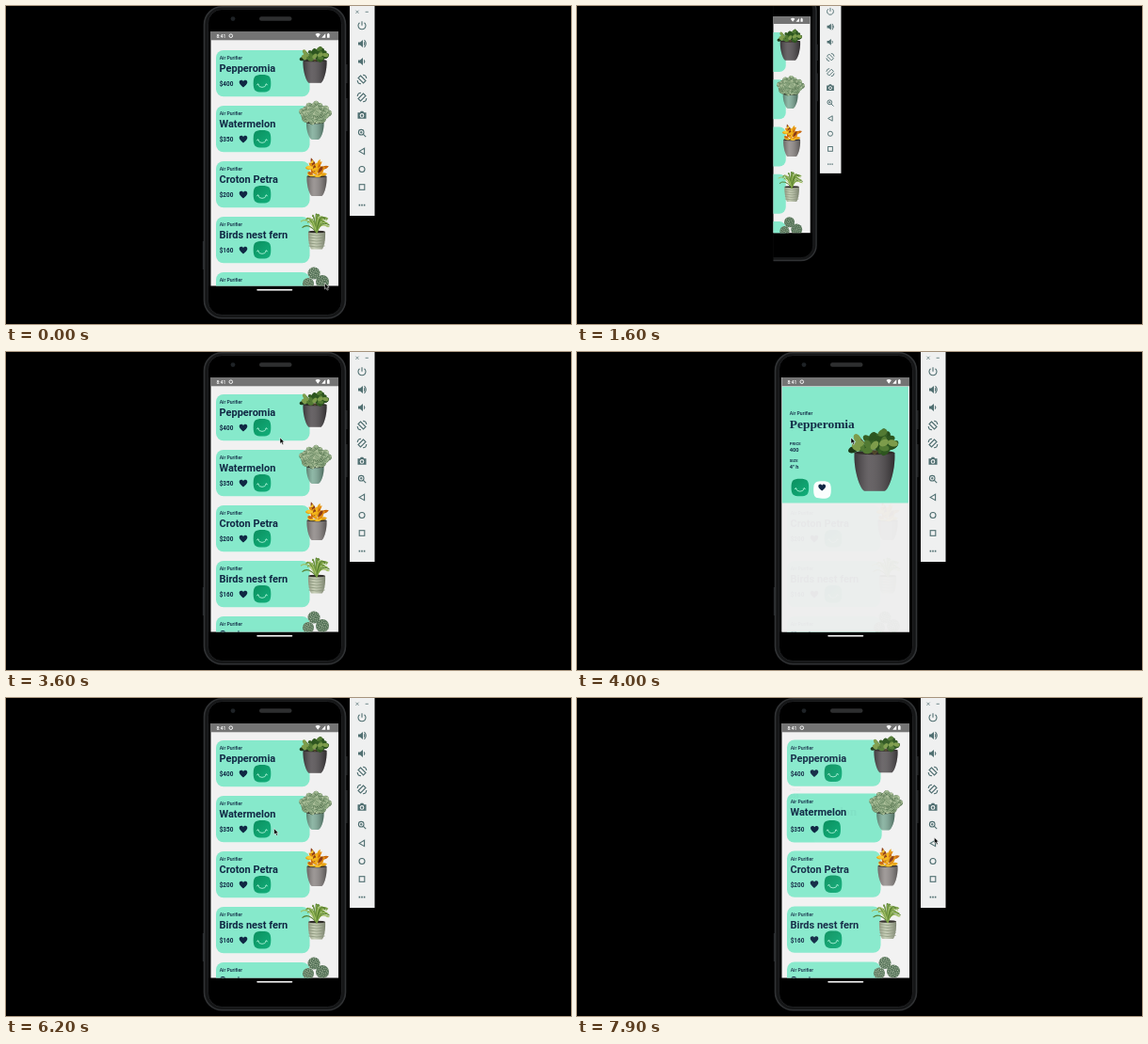
An HTML page for the animation above (8 s loop, 600 by 338 pixels).

```html
<!DOCTYPE html>
<html lang="en">
<head>
<meta charset="utf-8">
<title>Plant shop</title>
<style>
html, body { margin: 0; height: 100%; overflow: hidden; background: #000; }
svg { display: block; width: 100%; height: 100%; font-family: Roboto, sans-serif; }
.title { font-family: "Liberation Serif", serif; }
.icon { fill: none; stroke: #4f6e70; stroke-width: 1.1; }
.solid { fill: #4f6e70; }
</style>
</head>
<body>
<svg viewBox="0 0 600 338">
  <defs>
    <linearGradient id="shade">
      <stop offset="0" stop-opacity=".25"/><stop offset=".35" stop-color="#fff" stop-opacity=".16"/>
      <stop offset="1" stop-opacity=".38"/>
    </linearGradient>
    <linearGradient id="green" x2="1" y2="1"><stop stop-color="#0b8f5f"/><stop offset="1" stop-color="#12b07b"/></linearGradient>
    <clipPath id="screen"><rect x="217.5" y="27" width="135.5" height="270.5"/></clipPath>
    <clipPath id="window"><rect x="208.5" width="184" height="338"/></clipPath>
    <path id="heart" d="M0 3.9C-2.6 1.7-4.3.4-4.3-1.5C-4.3-4-1.2-4.6 0-2.4C1.2-4.6 4.3-4 4.3-1.5C4.3.4 2.6 1.7 0 3.9Z" fill="#102844"/>
    <path id="tile" d="M0-9.3C7.5-9.3 9.3-7.5 9.3 0S7.5 9.3 0 9.3S-9.3 7.5-9.3 0S-7.5-9.3 0-9.3Z"/>
    <g id="smile">
      <use href="#tile" fill="url(#green)"/>
      <path d="M-4.5 1Q-3.6 4.2 0 4.2T4.5 1M-5.6 2L-4.5.4L-3.4 1.6M5.6 2L4.5.4L3.4 1.6" fill="none" stroke="#a5efd3" stroke-width=".9"/>
    </g>
  </defs>
  <g id="stage"></g>
</svg>
<script>
const INK = '#102844', MINT = '#86e9cb';
const items = [['Pepperomia', 400], ['Watermelon', 350], ['Croton Petra', 200], ['Birds nest fern', 160], ['Cactus', 120]];

let seed = 7;
const rnd = (a = 0, b = 1) => a + (b - a) * ((seed = seed * 16807 % 2147483647) / 2147483647);
const many = (n, f) => Array.from({ length: n }, (_, i) => f(i)).join('');
const pick = (list, i) => list[i % list.length];
const text = (x, y, size, weight, str, extra = '') =>
  `<text x="${x}" y="${y}" font-size="${size}" font-weight="${weight}" fill="${INK}" ${extra}>${str}</text>`;
const at = (x, y, body, more = '') => `<g transform="translate(${x} ${y}) ${more}">${body}</g>`;
const use = (id, x, y, scale = 1) => `<use href="#${id}" transform="translate(${x} ${y}) scale(${scale})"/>`;

function pot(x, top, w, bottom, color, taper) {
  const h = bottom - top, in1 = w * taper;
  const d = `M${x} ${top}h${w}C${x + w + .6} ${top + h * .5} ${x + w - in1} ${bottom} ${x + w - in1 * 1.6} ${bottom}` +
    `H${x + in1 * 1.6}C${x + in1} ${bottom} ${x - .6} ${top + h * .5} ${x} ${top}Z`;
  return `<path d="${d}" fill="${color}"/><path d="${d}" fill="url(#shade)"/>` +
    `<ellipse cx="${x + w / 2}" cy="${top}" rx="${w / 2}" ry="1.3" fill="#302c28"/>`;
}

function jade() {
  const colors = ['#1d3a17', '#274c1c', '#365f24', '#2d551f', '#527a33', '#7d9c4b'];
  return pot(-12.5, -4, 25, 19.8, '#4c474a', .16) +
    many(5, i => `<path d="M0-3L${i * 5 - 10}-14" stroke="#51482b" stroke-width=".8"/>`) +
    many(38, i => {
      const a = rnd(-80, 80), r = rnd(5, 15.5), c = a * Math.PI / 180;
      return at((Math.sin(c) * r * .92).toFixed(1), (-3.5 - Math.cos(c) * r * .95).toFixed(1),
        `<ellipse rx="2" ry="3.1" fill="${colors[Math.min(5, (i / 7 + rnd(0, 1.3)) | 0)]}"/>`, `rotate(${(a + rnd(-50, 50)) | 0})`);
    });
}

function striped() {
  return pot(-9, 3, 18.5, 21, '#79a995', .2) + many(27, i => {
    const a = i * 2.4, r = Math.sqrt(1 - i / 27);
    return at((Math.cos(a) * r * 13.5).toFixed(1), (-7 + Math.sin(a) * r * 9).toFixed(1),
      `<ellipse rx="3.7" ry="4.6" fill="${pick(['#4d6d49', '#5f815b', '#718f68'], i)}"/>` +
      `<path d="M0-4.4V4.4M0-4.4Q-3.2 0 0 4.4M0-4.4Q3.2 0 0 4.4M0-4.4Q-6 0 0 4.4M0-4.4Q6 0 0 4.4" fill="none" stroke="#bccda8" stroke-width=".55"/>`,
      `rotate(${(Math.cos(a) * 75) | 0})`);
  });
}

function croton() {
  const colors = ['#8d3c17', '#c9680f', '#e59012', '#f3b51a', '#f6c930', '#e8a313'];
  return pot(-8.5, 1, 21, 22, '#8a8482', .16) + many(36, i => {
    const l = rnd(8, 14) * (1 - i / 110);
    return at(rnd(-4, 5).toFixed(1), rnd(-8, 1).toFixed(1),
      `<path d="M0 0Q3.4-${l * .6} 0-${l}Q-3.4-${l * .6} 0 0Z" fill="${pick(colors, i * 5 + (i / 6 | 0))}"/>`,
      `rotate(${rnd(-85, 85) | 0})`);
  });
}

function fern() {
  return pot(-7, 1, 18, 19.5, '#bcc5a8', .12) +
    many(5, i => `<path d="M-6.5 ${4 + i * 3}q8.5 2 17 0" fill="none" stroke="#8b967b" stroke-width=".8"/>`) +
    many(34, i => {
      const x = rnd(-17, 15), y = -17 + Math.abs(x) * rnd(.3, 1.25);
      return `<path d="M2 2Q${(x * .45).toFixed(1)} ${(y - 6).toFixed(1)} ${(2 + x).toFixed(1)} ${y.toFixed(1)}" fill="none"
        stroke="${pick(['#557c2c', '#7fa544', '#a1bf63', '#6b923a'], i)}" stroke-width="1.1"/>`;
    });
}

function cactus() {
  const ball = (x, y, r) => `<circle cx="${x}" cy="${y}" r="${r}" fill="#57745a"/>` + many(30, i => {
    const a = i * 2.4, d = r * Math.sqrt(i / 30);
    return `<circle cx="${(x + Math.cos(a) * d).toFixed(1)}" cy="${(y + Math.sin(a) * d).toFixed(1)}" r=".55" fill="#b4c4a9"/>`;
  });
  return ball(-1, -14, 6.5) + ball(-7, -3, 6) + ball(8, -5, 7);
}

document.querySelector('defs').insertAdjacentHTML('beforeend',
  [jade, striped, croton, fern, cactus].map((f, i) => `<g id="plant${i}">${f()}</g>`).join(''));

const card = ([name, price], i) => at(0, 47 + 59 * i,
  `<rect x="223" width="99.5" height="49.3" rx="8" fill="${MINT}"/>` +
  text(226.7, 10, 5.1, 500, 'Air Purifier') + text(226.5, 23, 11, 700, name) +
  text(226.7, 38, 6.4, 600, '$' + price) + use('heart', 252, 35.5) + use('smile', 272, 35.2) +
  use('plant' + i, 328, 15));

const body = `<rect x="210.5" y=".8" width="150" height="331" rx="19" fill="#151617" stroke="#303234" stroke-width="1.6"/>
  <rect x="214.5" y="3.5" width="142" height="325" rx="15" stroke="#222426" stroke-width=".8"/>
  <path d="M209.3 250v30M361.8 62v20M361.8 98v35" stroke="#2b2d2f" stroke-width="1.2"/>
  <rect x="269" y="11.3" width="34.5" height="4.4" rx="2.2" fill="#2e2f30"/>
  <circle cx="241" cy="13.6" r="2.4" fill="#1e2226"/>
  <path d="M267 301.8h36.5" stroke="#fff" stroke-width="1.5" stroke-linecap="round"/>`;

const statusBar = `<rect x="217.5" y="27" width="135.5" height="9.3" fill="#747474"/>` +
  text(223.5, 33.7, 5, 500, '8:41', 'style="fill:#fff"') +
  `<circle cx="238.8" cy="31.7" r="1.8" fill="none" stroke="#fff" stroke-width=".9"/>
  <path d="M328.5 30q2.7-1.9 5.4 0l-2.7 3.8zM335.2 33.8h4v-4.5zM341 29.8h.7v-.7h1.2v.7h.7v4h-2.6z" fill="#fff"/>`;

const turn = '<path d="M-1.5-4L4 1.5L1.5 4L-4-1.5Z"/><path d="M1-4.8Q4.6-4.6 4.8-1M-1 4.8Q-4.6 4.6-4.8 1"/>';
const speaker = '<path class="solid" stroke="none" d="M-4-1.5h2L1-4V4L-2 1.5h-2z"/><path d="M2.2-1.7q1.4 1.7 0 3.4"/>';
const toolbar = `<rect x="365" width="26.5" height="223" fill="#eff0f0"/><g class="icon">` +
  at(373, 6.3, '<path d="M-1.6-1.6L1.6 1.6M1.6-1.6L-1.6 1.6" stroke-width=".7"/>') +
  at(383.2, 6.3, '<path d="M-1.6 0H1.6" stroke-width=".8"/>') +
  at(378, 20.7, '<path d="M-2.5-3A4 4 0 1 0 2.5-3M0-4.5V0"/>') +
  at(378, 40, speaker + '<path d="M2.5-3.8q3.4 3.8 0 7.6"/>') +
  at(378, 59, speaker) + at(378, 78, turn) + at(378, 97, turn, 'scale(-1 1)') +
  at(378, 116, '<path class="solid" stroke="none" d="M-4.5-2.8h2.3l1-1.4h2.4l1 1.4h2.3v6.6h-9z"/><circle cy=".4" r="1.8" stroke="#eff0f0"/>') +
  at(378, 135, '<circle cx="-.8" cy="-.8" r="2.8"/><path d="M1.2 1.2L4.2 4.2M-2-.8H.4M-.8-2V.4"/>') +
  at(378, 154.4, '<path d="M2.6-3.2V3.2L-2.8 0z"/>') + at(378, 173.5, '<circle r="3"/>') +
  at(378, 192.5, '<rect x="-2.8" y="-2.8" width="5.6" height="5.6"/>') +
  at(378, 211.6, '<path d="M-3.4 0h1.6M-.8 0h1.6M1.8 0h1.6" stroke-width="1.6"/>') + '</g>';

const clamp = v => Math.max(0, Math.min(1, v));
const ease = v => 1 - (1 - clamp(v)) ** 3;

// Product page growing out of card i; p runs from 0 (card) to 1 (page).
function page(i, p, scroll) {
  const [name, price] = items[i], top = 47 + 59 * i - scroll;
  const mix = (a, b) => +(a + (b - a) * p).toFixed(2);
  const fade = `opacity="${p}"`, out = `opacity="${1 - p}"`;
  return at(0, 12 * p * (1 - p),
    `<rect x="217" y="20" width="137" height="280" fill="#efefef" ${fade}/>
    <rect x="${mix(223, 217.5)}" y="${mix(top, 36)}" width="${mix(99.5, 135.5)}" height="${mix(49.3, 126.7)}" rx="${mix(8, 0)}" fill="${MINT}"/>` +
    text(mix(226.7, 225.8), mix(top + 10, 67), 5.1, 500, 'Air Purifier') +
    text(mix(226.5, 225.8), mix(top + 23, 81), 11, 700, name, out) +
    text(mix(226.5, 225.8), mix(top + 23, 80.8), 13.4, 700, name, `class="title" ${fade}`) +
    text(226.7, top + 38, 6.4, 600, '$' + price, out) +
    `<g ${fade}>` + text(225.8, 98.4, 4.2, 700, 'PRICE') + text(225.8, 105.5, 5.7, 600, price) +
    text(225.8, 116.8, 4.2, 700, 'SIZE') + text(225.8, 123.8, 5.7, 600, '4" h') +
    at(260.5, 146, '<use href="#tile" fill="#fff"/>') + '</g>' +
    use('heart', mix(252, 260.5), mix(top + 35.5, 146), mix(1, .9)) +
    use('smile', mix(272, 235.5), mix(top + 35.2, 146)) +
    use('plant' + i, mix(328, 315.5), mix(top + 15, 115.5), mix(1, 1.74)));
}

// Pointer stops: time, x, y
const path = [
  [0, 338.5, 294.5], [100, 340, 303], [300, 366, 120], [500, 377.5, 5], [1900, 385, 60], [2400, 336, 159],
  [2500, 335, 159], [2800, 291.7, 154], [3000, 263, 105], [3100, 270, 64], [3200, 291, 91], [4000, 291, 91],
  [4300, 340, 102], [4600, 372, 125], [4900, 381, 148], [5200, 378, 151], [5600, 378, 151], [6000, 300, 142],
  [6100, 284, 138], [6200, 284.7, 138.7], [6500, 284.7, 138.7], [6800, 310, 151.5], [7200, 352, 149],
  [7400, 379, 149], [8000, 379.5, 148]
];
function pointer(t) {
  if (t >= 700 && t < 1900) return '';
  const k = path.findIndex(s => s[0] > t), [t0, x0, y0] = path[k - 1], [t1, x1, y1] = path[k];
  const u = (t - t0) / (t1 - t0);
  return at(x0 + (x1 - x0) * u, y0 + (y1 - y0) * u,
    '<path d="M0 0V6.4L1.5 5.1L2.6 7.6L3.8 7L2.7 4.7H4.6Z" stroke="#fff" stroke-width=".5"/>');
}

function draw(t) {
  if (t >= 800 && t < 1600) return '';
  const scroll = t < 3500 ? 0 : t < 6400 ? 2 : 2.5;
  const p = clamp(ease((t - 3600) / 600) - ease((t - 5300) / 450) + ease((t - 6350) / 450) - ease((t - 7580) / 480));
  const chosen = t < 6300 ? 0 : 1;
  const list = items.map((item, i) => p && i === chosen ? '' : card(item, i)).join('');
  const u = t < 700 ? 1 : t < 800 ? 0 : ease((t - 1600) / 250);
  const view = `translate(${-52.7 * (1 - u)} ${-11.9 * (1 - u)}) scale(${.851 + .149 * u})`;
  return `<g clip-path="url(#window)"><g transform="${view}" opacity="${t === 700 ? .5 : 1}">${body}
    <g clip-path="url(#screen)"><rect x="217" y="27" width="137" height="271" fill="#f1f1f1"/>
    ${at(0, -scroll, list)}${p ? page(chosen, p, scroll) : ''}${statusBar}</g>${toolbar}</g></g>${pointer(t)}`;
}

const stage = document.getElementById('stage');
let last = -1;
function frame(now) {
  const t = Math.floor(now % 8000 / 100) * 100;
  if (t !== last) stage.innerHTML = draw(last = t);
  requestAnimationFrame(frame);
}
frame(performance.now());
</script>
</body>
</html>
```
